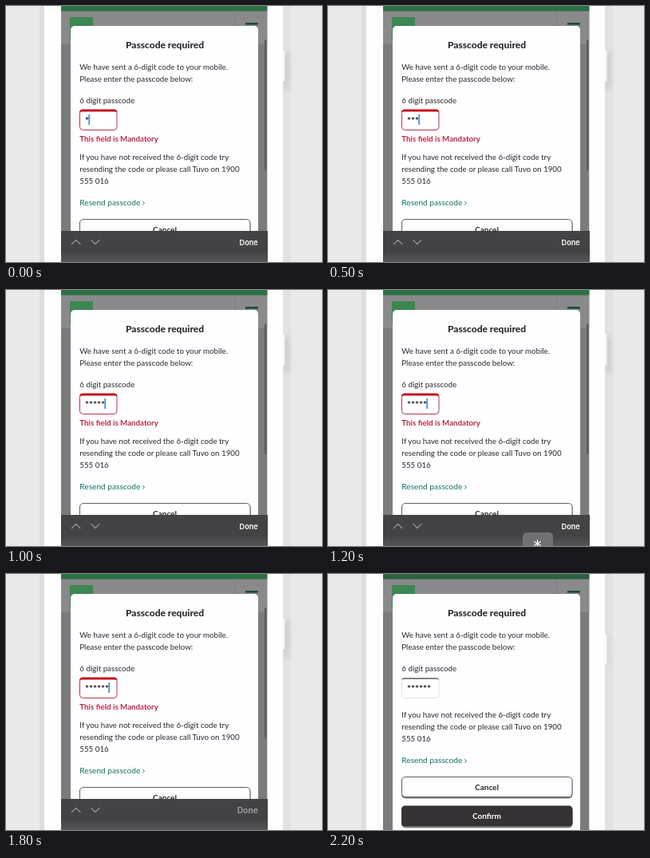
Recreate the animation shown at these times as an HTML page. Size 396x321 px, loop 5.7 s.

```html
<!DOCTYPE html>
<html lang="en">
<head>
<meta charset="utf-8">
<title>Passcode form</title>
<style>
html, body { margin: 0; width: 100%; height: 100%; overflow: hidden; background: #e9e9e9; }
svg { display: block; width: 100vw; height: 100vh; }
text { font: 400 9.75px Lato, sans-serif; fill: #2b282b; white-space: pre; }
.bold { font-size: 10px; font-weight: 700; }
.mid { text-anchor: middle; }
.title { font-size: 12px; font-weight: 800; }
.star { font-size: 12px; font-weight: 700; }
.error { font-size: 9.8px; font-weight: 600; fill: #b5122f; }
.link { font-size: 10.15px; fill: #127365; }
.done { font: 600 9.2px Inter, sans-serif; fill: #fff; text-anchor: end; }
.line { fill: none; stroke-linecap: round; stroke-linejoin: round; }
</style>
</head>
<body>
<svg viewBox="0 0 396 321" preserveAspectRatio="none">
  <defs>
    <linearGradient id="keys" x2="0" y2="1">
      <stop stop-color="#444346"/><stop offset="1" stop-color="#565558"/>
    </linearGradient>
    <filter id="soft" x="-300%" width="700%"><feGaussianBlur stdDeviation="3"/></filter>
    <clipPath id="screen"><rect x="69" width="258.3" height="321"/></clipPath>
  </defs>

  <rect width="396" height="321" fill="#e9e9e9"/>
  <rect x="42" width="6" height="321" fill="#dedede"/>
  <rect x="347" width="10" height="321" fill="#e2e2e2"/>
  <g id="sideButton">
    <rect x="348" y="58" width="6" height="46" fill="#c9c9c9" filter="url(#soft)"/>
    <rect x="345" y="55" width="4.5" height="39.500" rx="1.5" fill="#f5f5f5"/>
  </g>
  <g id="sideButtonEnd">
    <rect x="348" y="76" width="5" height="38" fill="#d5d5d5" filter="url(#soft)"/>
    <rect x="345" y="75" width="4.5" height="38" rx="1.5" fill="#f5f5f5"/>
  </g>
  <rect x="48" width="299" height="321" fill="#fefefe"/>

  <g clip-path="url(#screen)">
    <rect x="69" width="259" height="321" fill="#7b7a7d"/>
    <rect x="69" width="259" height="48" fill="#8a898c"/>
    <rect id="topBar" x="69" width="259" height="6.5" fill="#2a7144"/>
    <rect x="80" y="14" width="29" height="29" fill="#3c8752"/>
    <path d="M286.5 7V48" stroke="#7f7e81"/>
    <rect x="300" y="21" width="16" height="2.6" fill="#174f39"/>
    <rect id="scrollbar" x="324" y="42" width="2.4" height="164" rx="1.2" fill="#5b5a5d"/>

    <rect x="81" y="25" width="235" height="310" rx="5" fill="#fefdff"/>
    <text class="bold mid title" x="199" y="53">Passcode required</text>
    <text x="92.3" y="79.5">We have sent a 6-digit code to your mobile.</text>
    <text x="92.3" y="94.5">Please enter the passcode below:</text>
    <text x="92.3" y="122">6 digit passcode</text>

    <g id="invalid">
      <rect x="92.5" y="130.5" width="46.5" height="25" rx="4" fill="#fff" stroke="#b33650"/>
      <path d="M92 133.5V133Q92.5 129.5 96 129.5H135.5Q139 129.5 139.5 133V133.5Q138.5 132.5 136 132.5H95.5Q93 132.5 92 133.5Z" fill="#c8101d"/>
      <text class="error" x="92.3" y="170">This field is Mandatory</text>
      <rect id="caret" x="103.2" y="136" width="2" height="13" fill="#5799e2"/>
    </g>
    <g id="valid">
      <rect x="92.5" y="130.5" width="46.5" height="25" rx="4" fill="#fefdff" stroke="#e6e4e7"/>
      <path d="M92 133Q92.5 130 96 130H135.5Q139 130 139.5 133Q138.5 132 136 132H95.5Q93 132 92 133Z" fill="#858482"/>
    </g>
    <g id="stars"></g>

    <g id="lower">
      <text x="92.3" y="192.5">If you have not received the 6-digit code try</text>
      <text x="92.3" y="207.5">resending the code or please call Tuvo on 1900</text>
      <text x="92.3" y="222.5">555 016</text>
      <text class="link" x="92.3" y="250">Resend passcode</text>
      <path class="line" d="M171.5 245.2L173.5 247.2L171.5 249.2" stroke="#127365"/>
      <rect x="92" y="268" width="214.5" height="26.5" rx="5" fill="#777579"/>
      <rect x="92.5" y="267.5" width="213.5" height="25" rx="4.5" fill="#fefdff" stroke="#625f63"/>
      <text class="bold mid" x="199" y="283.5">Cancel</text>
      <rect x="92" y="305" width="214.5" height="26.5" rx="5" fill="#89878a"/>
      <rect x="92" y="303.5" width="214.5" height="26" rx="4.5" fill="#363235"/>
      <text class="bold mid" x="199" y="320.3" style="fill:#fff">Confirm</text>
    </g>

    <g id="keyboard">
      <rect x="69" y="309" width="259" height="12" fill="url(#keys)"/>
      <rect x="69" y="282" width="259" height="27.5" fill="#434245"/>
      <path class="line" d="M82.5 298.5L87.7 293.3L92.9 298.5M106.7 293.3L111.9 298.5L117.1 293.3" stroke="#98979a" stroke-width="1.2"/>
      <text id="done" class="done" x="315.8" y="299.7">Done</text>
      <g id="keyPopup">
        <rect x="244" y="304" width="38" height="24" rx="5" fill="#717074"/>
        <path class="line" d="M262.5 313.5V322.5M258.6 315.75L266.4 320.25M258.6 320.25L266.4 315.75" stroke="#fff" stroke-width="1.2"/>
      </g>
    </g>
  </g>
</svg>
<script>
const LOOP = 5700;
const TYPED = [0, 200, 400, 700, 900, 1300];
const PITCH = 5;
const CLOSING = 1600;
const CLOSED = 1900;
const get = id => document.getElementById(id);

// Steps are [ms, value] pairs; each value holds unless an easing is given.
function track(el, prop, steps, easing = 'step-end') {
  const frames = steps.map(([ms, value]) => ({ offset: ms / LOOP, [prop]: value, easing }));
  frames.push({ offset: 1, [prop]: steps[steps.length - 1][1] });
  el.animate(frames, { duration: LOOP, iterations: Infinity });
}

function show(el, from, to = LOOP) {
  const steps = [[0, from > 0 ? 0 : 1]];
  if (from > 0) steps.push([from, 1]);
  if (to < LOOP) steps.push([to, 0]);
  track(el, 'opacity', steps);
}

TYPED.forEach((ms, i) => {
  const star = document.createElementNS('http://www.w3.org/2000/svg', 'text');
  star.setAttribute('class', 'star mid');
  star.setAttribute('x', 101.5 + PITCH * i);
  star.setAttribute('y', 148);
  star.textContent = '*';
  get('stars').append(star);
  show(star, ms);
});

track(get('caret'), 'transform', TYPED.map((ms, i) => [ms, `translateX(${PITCH * i}px)`]));
track(get('lower'), 'transform', [[0, 'translateY(0px)'], [CLOSED, 'translateY(-13px)']]);
track(get('topBar'), 'fill', [[0, '#2a7144'], [CLOSED, '#296340']]);
track(get('done'), 'fill', [[0, '#fff'], [1500, '#fff'], [1800, '#a4a3a6']], 'linear');
track(get('done'), 'fontSize', [[0, '9.2px'], [CLOSING, '10.3px']]);

for (const id of ['invalid', 'keyboard', 'scrollbar']) show(get(id), 0, CLOSED);
show(get('valid'), CLOSED);
show(get('keyPopup'), 1200, 1300);
show(get('sideButton'), 0, 2200);
show(get('sideButtonEnd'), 2200);
</script>
</body>
</html>
```
